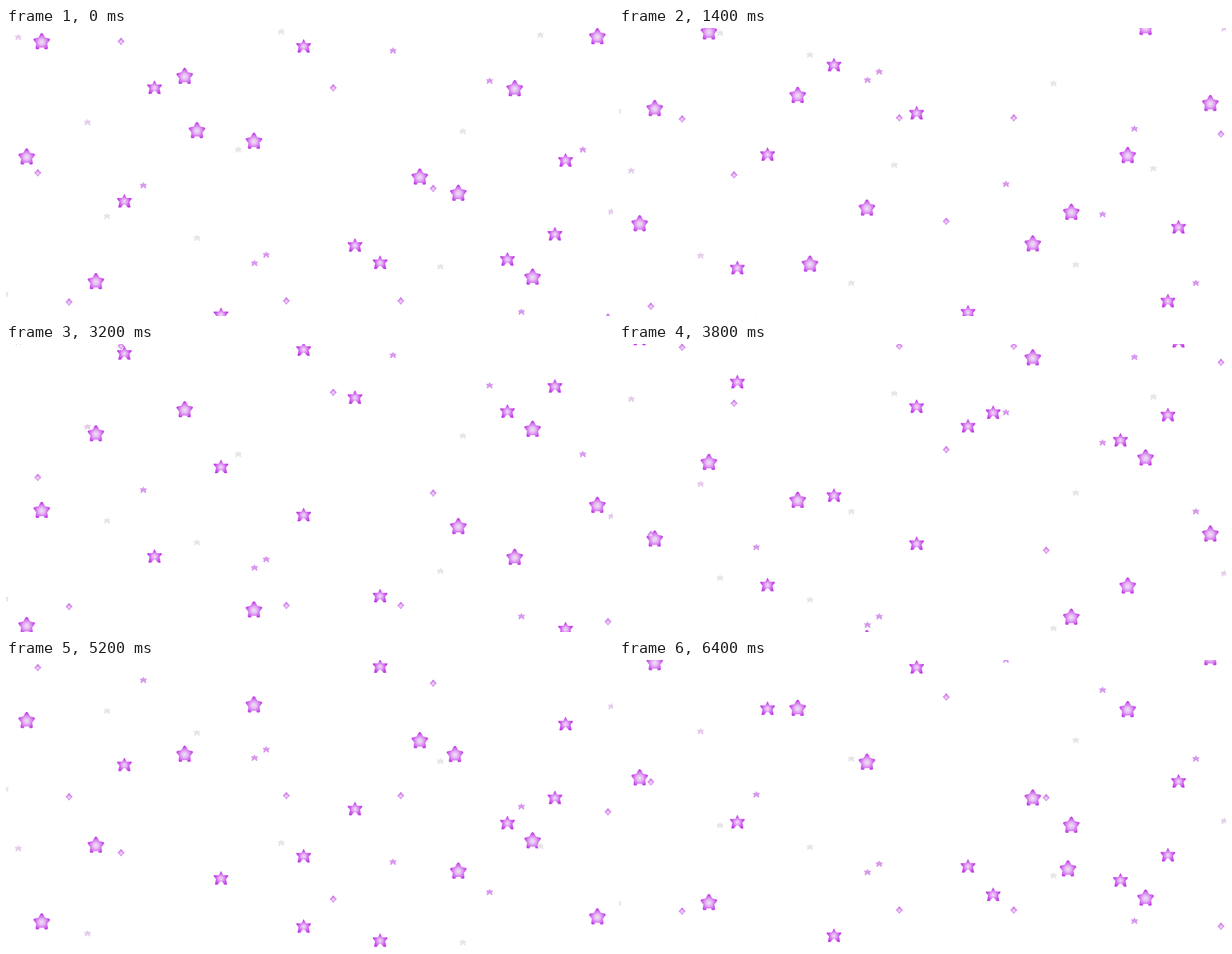
Animation of 1087x515 px, one loop 6600 ms. Source, as an HTML page with a canvas:

```html
<!DOCTYPE html>
<html lang="en">
<head>
<meta charset="utf-8">
<title>Falling stars</title>
<style>
html, body { margin: 0; width: 100%; height: 100%; overflow: hidden; background: #fff; }
canvas { display: block; }
</style>
</head>
<body>
<canvas id="sky" width="1087" height="515"></canvas>
<script>
const ctx = document.getElementById('sky').getContext('2d');
const STEP = 200, STEPS = 33;
const SLOW = 17.07, QUICK = 34.1;
const SPAN = 566, TOP = -26, FAST_SPAN = 490;

const mod = (a, n) => ((a % n) + n) % n;

// Right half of a symmetric outline, mirrored to the left
function outline(half, scale = 1) {
  const path = new Path2D();
  const left = half.filter(([x]) => x > 0).reverse().map(([x, y]) => [-x, y]);
  for (const [x, y] of [...half, ...left]) path.lineTo(x * scale, y * scale);
  path.closePath();
  return path;
}

function glow(radius, ...stops) {
  const g = ctx.createRadialGradient(0, 1, 0, 0, 1, radius);
  stops.forEach((color, i) => g.addColorStop(i / (stops.length - 1), color));
  return g;
}

const bigHalf = [[0, -15], [2, -14], [6, -7], [14, -5], [15, -3], [10, 4], [11, 12], [10, 14], [5, 14], [4, 11], [0, 11]];
const mediumHalf = [[0, -12.5], [4, -5], [13, -5], [13, -3], [9, 2], [11, 12], [6, 12], [3, 8], [0, 6]];
const diamondHalf = [[0, -7], [6.5, 0], [0, 7]];
const tiny = outline(mediumHalf, 0.47);

const kinds = {
  big: [outline(bigHalf), glow(15, '#f1e2f5', '#e6bdf3', '#d67af0', '#bf3be6')],
  medium: [outline(mediumHalf), glow(13, '#f3dff8', '#e3a9f4', '#cf62ee', '#bf3be6')],
  diamond: [outline(diamondHalf, 0.95), glow(7, '#f5e0fa', '#dc9df0', '#c050e2')],
  violet: [tiny, '#d898ee'],
  pale: [tiny, '#e5cdec'],
  gray: [tiny, '#e6e6e6'],
};

function draw(kind, x, y) {
  const [path, fill] = kinds[kind];
  ctx.save();
  ctx.translate(x, y);
  ctx.fillStyle = fill;
  ctx.fill(path);
  ctx.restore();
}

// [kind, speed per step, x and start y of each star]
const layers = [
  ['big', SLOW, [[64, 24], [911, 108], [1059, 15], [37, 230], [444, 202], [741, 266], [161, 453], [943, 445]]],
  ['medium', SLOW, [[533, 32], [266, 106], [212, 309], [1002, 236], [625, 388], [983, 368], [898, 413], [385, 512]]],
  ['gray', QUICK, [[493, 6], [957, 12], [416, 217], [818, 184], [181, 336], [342, 375], [778, 426], [-1, 475]]],
  ['pale', QUICK, [[22, 16], [146, 168], [1084, 328]]],
  ['violet', QUICK, [[693, 40], [866, 94], [1033, 217], [246, 281], [466, 405], [445, 420], [923, 507]]],
  ['diamond', QUICK, [[206, 24], [586, 107], [57, 259], [765, 287], [113, 490], [502, 488], [707, 488], [1078, 517]]],
];

// Stars that fall once: kind, x, y, step of that y, first step
const singles = [
  ['big', 342, 183, 0, 0],
  ['medium', 533, 9, 16, 15],
  ['big', 804, 32, 22, 20],
];

// Distance covered by the fastest stars, as [step, distance]
const fastRun = [[0, 0], [7, 524], [12, 778], [16, 1011], [22, 1335], [26, 1552], [32, 1960]];

function fastDistance(n) {
  const i = Math.max(1, fastRun.findIndex(([step]) => step >= n));
  const [n0, d0] = fastRun[i - 1], [n1, d1] = fastRun[i];
  return d0 + (d1 - d0) * (n - n0) / (n1 - n0);
}

function drawFast(kind, x, start, n) {
  const y = mod(start + fastDistance(n), FAST_SPAN);
  draw(kind, x, y);
  draw(kind, x, y + FAST_SPAN);
}

function render(n) {
  ctx.fillStyle = '#fff';
  ctx.fillRect(0, 0, 1087, 515);
  drawFast('big', 320, 86, n);
  drawFast('big', 810, 295, n);
  if (n < 1 || n > 9) drawFast('medium', 670, 419, n);
  for (const [kind, x, y, at, first] of singles) {
    if (n >= first) draw(kind, x, y + QUICK * (n - at));
  }
  for (const [kind, speed, stars] of layers) {
    for (const [x, y] of stars) draw(kind, x, mod(y + speed * n - TOP, SPAN) + TOP);
  }
}

const begin = performance.now();
function tick() {
  render(Math.floor((performance.now() - begin) / STEP) % STEPS);
  requestAnimationFrame(tick);
}
tick();
</script>
</body>
</html>
```
